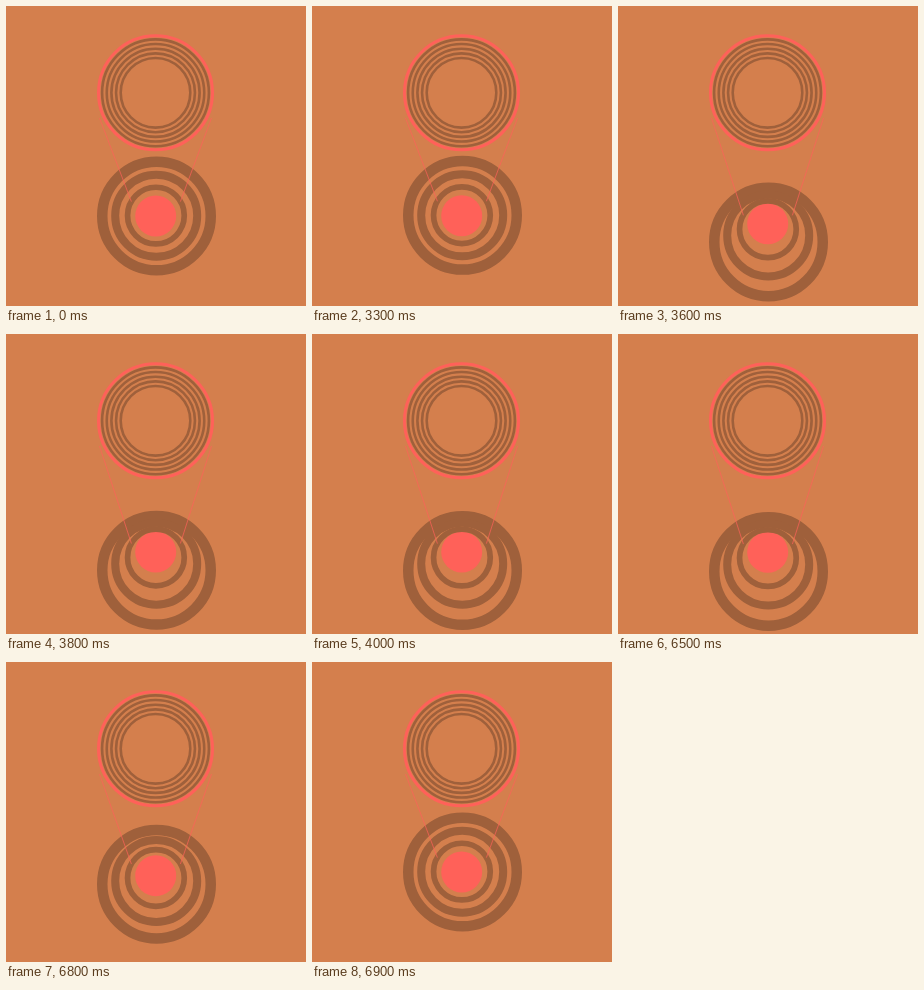
An HTML page with a canvas for the animation above (7000 ms loop, 300 by 300 pixels).

```html
<!DOCTYPE html>
<html lang="en">
<head>
<meta charset="utf-8">
<title>Rings</title>
<style>
  html, body { margin: 0; width: 100%; height: 100%; overflow: hidden; background: #d47f4d; }
  canvas { display: block; width: 300px; height: 300px; }
</style>
</head>
<body>
<canvas id="stage" width="300" height="300"></canvas>
<script>
const ctx = document.getElementById('stage').getContext('2d');
const LOOP = 7000, STEP = 100;
const BG = '#d47f4d', BROWN = '#9f603b', PINK = '#ff6159';
const TOP = { x: 149.5, y: 86.8 };
const BALL = { x: 149.7, y: 210, r: 20.5, drop: 8 };

// Share of the full drop, one value per 100 ms step.
const DOWN = { start: 3300, values: [-0.025, 0.24, 0.84, 0.98, 0.987, 0.992, 0.996, 1] };
const UP = { start: 6500, values: [1.035, 1.025, 0.94, 0.46, 0] };

// Centre, inner and outer radius, and how far each ring drops.
const RINGS = [
  { x: 150.5, y: 210, inner: 49, outer: 59.5, drop: 26.5 },
  { x: 150.2, y: 209.8, inner: 37, outer: 45, drop: 20 },
  { x: 149.9, y: 209.6, inner: 25.5, outer: 31.2, drop: 14 }
];

function dropAt(time) {
  if (time < DOWN.start) return 0;
  const phase = time < UP.start ? DOWN : UP;
  const i = Math.floor((time - phase.start) / STEP);
  return phase.values[Math.min(i, phase.values.length - 1)];
}

function circle(x, y, r, width, color) {
  ctx.strokeStyle = color;
  ctx.lineWidth = width;
  ctx.beginPath();
  ctx.arc(x, y, r, 0, Math.PI * 2);
  ctx.stroke();
}

function drawBall(p) {
  ctx.fillStyle = PINK;
  ctx.beginPath();
  ctx.arc(BALL.x, BALL.y + BALL.drop * p, BALL.r, 0, Math.PI * 2);
  ctx.fill();
}

function drawRings(p) {
  for (const { x, y, inner, outer, drop } of RINGS) {
    circle(x, y + drop * p, (inner + outer) / 2, outer - inner, BROWN);
  }
}

// The strings hang from the top circle and hold the innermost ring.
function drawStrings(p) {
  const ring = RINGS[2];
  const endY = ring.y + ring.drop * p - 14;
  ctx.strokeStyle = PINK;
  ctx.lineWidth = 0.7;
  for (const side of [-1, 1]) {
    ctx.beginPath();
    ctx.moveTo(TOP.x + side * 56, 112);
    ctx.lineTo(ring.x + side * 24.5, endY);
    ctx.stroke();
  }
}

function drawTop() {
  circle(TOP.x, TOP.y, 57, 3, PINK);
  for (let i = 0; i < 5; i++) circle(TOP.x, TOP.y, 53.4 - i * 4.65, 2.6, BROWN);
}

function draw(time) {
  const p = dropAt(time % LOOP);
  ctx.fillStyle = BG;
  ctx.fillRect(0, 0, 300, 300);
  drawBall(p);
  drawRings(p);
  drawStrings(p);
  drawTop();
}

let start = null;
function tick(now) {
  if (start === null) start = now;
  draw(now - start);
  requestAnimationFrame(tick);
}
draw(0);
requestAnimationFrame(tick);
</script>
</body>
</html>
```
